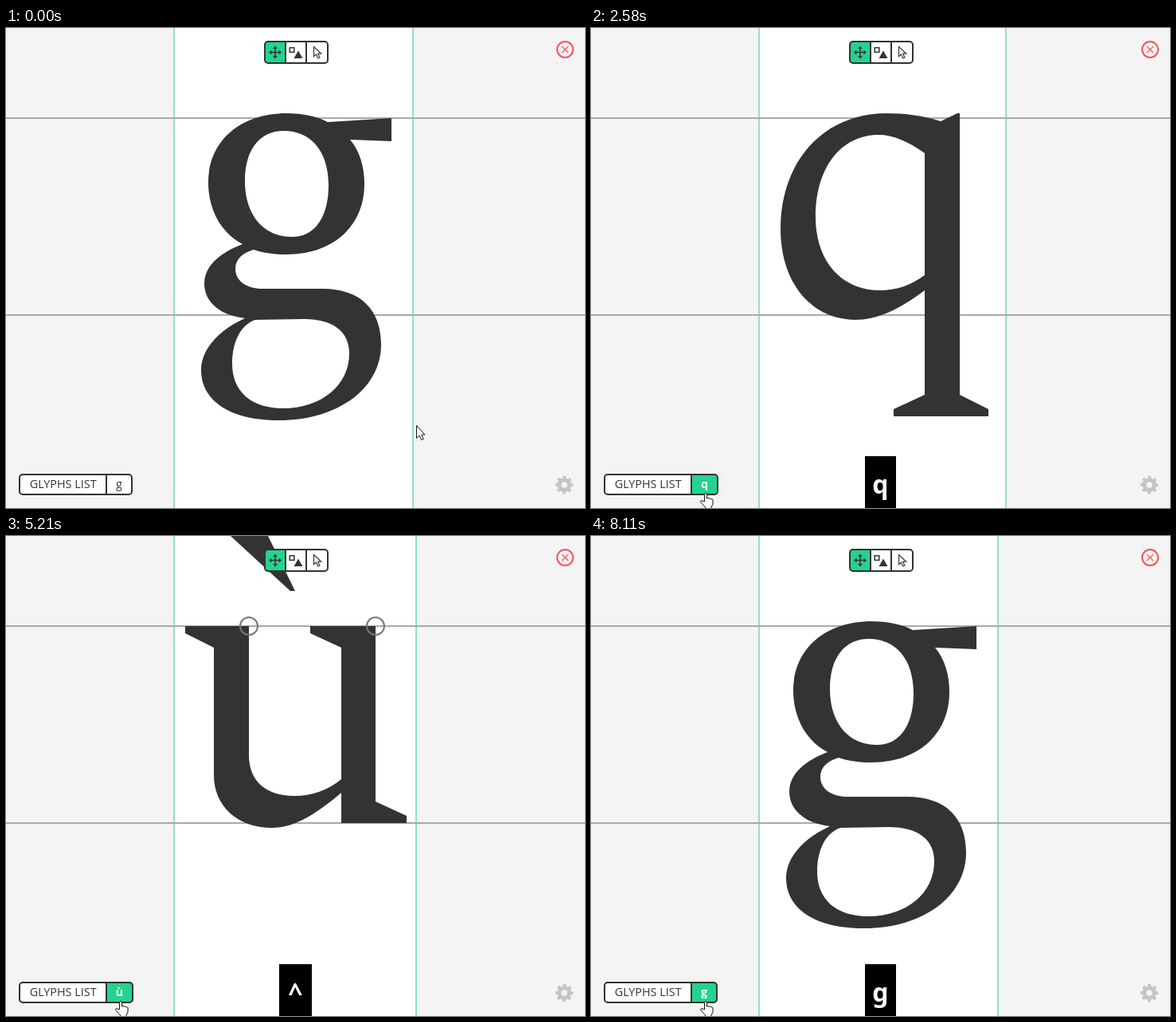
Recreate the animation shown at these times as an HTML page. Size 727 by 602 pixels, loop 8540 ms.

```html
<!DOCTYPE html>
<html lang="en">
<head>
<meta charset="utf-8">
<title>Glyph editor</title>
<style>
  html, body { margin: 0; height: 100%; overflow: hidden; background: #f4f4f4; }
  svg { display: block; }
  text { font: 14.4px "Open Sans", sans-serif; text-anchor: middle; fill: #333; }
  .line { fill: none; stroke: #333; stroke-width: 2; }
  .key text { font: bold 32px "Noto Sans", sans-serif; fill: #fff; }
  .guide { stroke: #8ee2c4; stroke-width: 2; }
  .metric { stroke: #a9a9a9; stroke-width: 2; }
  .pointer { fill: #fff; stroke: #111; stroke-linejoin: round; }
</style>
</head>
<body>
<svg width="727" height="602" viewBox="0 0 727 602">
  <rect id="page" x="211" width="300" height="602" fill="#fff"/>
  <path class="guide" d="M211 0V602"/>
  <path class="guide" id="advance"/>
  <path class="metric" d="M0 113H727M0 360H727"/>
  <path id="glyph" fill="#333" fill-rule="evenodd"/>
  <g id="nodes" fill="none" stroke="#777" stroke-width="2">
    <circle cx="305" cy="113" r="11"/><circle cx="464" cy="113" r="11"/>
  </g>

  <!-- toolbar -->
  <rect x="325" y="17" width="79" height="27" rx="4" fill="#fff"/>
  <path d="M351 17H329q-4 0-4 4v19q0 4 4 4h22z" fill="#24d390"/>
  <rect class="line" x="325" y="17" width="79" height="27" rx="4"/>
  <path class="line" d="M351 17V44M377 17V44"/>
  <g transform="translate(338 30.5)" fill="#333">
    <path d="M-6 0H6M0-6V6" stroke="#333" stroke-width="1.5"/>
    <path d="M0-8l3 3.5h-6zM0 8l3-3.5h-6zM-8 0l3.5-3v6zM8 0l-3.5-3v6z"/>
  </g>
  <rect class="line" x="356.2" y="24.7" width="5.6" height="5.6" style="stroke-width:1.5"/>
  <path d="M367 28.5l5.5 9.5h-11z" fill="#333"/>
  <path d="M386.5 23.5v12l3-2.5 2.2 5 2.2-1-2.2-4.8h4z" fill="#fff" stroke="#444" stroke-width="1.3"/>

  <!-- close and settings -->
  <g fill="none" stroke="#f9545b">
    <circle cx="702" cy="27" r="10" stroke-width="2"/>
    <path d="M698 23l8 8m0-8l-8 8" stroke-width="1.2"/>
  </g>
  <g fill="none" stroke="#c4c4c4">
    <circle cx="701" cy="573" r="6.3" stroke-width="5"/>
    <circle cx="701" cy="573" r="9.5" stroke-width="3.4" stroke-dasharray="3.73" stroke-dashoffset="1.87"/>
  </g>

  <!-- glyph button -->
  <rect class="frame" x="17" y="560" height="25" rx="4" fill="#fff"/>
  <path id="cell"/>
  <rect class="frame line" x="17" y="560" height="25" rx="4"/>
  <path class="line" d="M126 560V585"/>
  <text x="71.7" y="577">GLYPHS LIST</text>
  <text id="label" y="577"></text>

  <g id="keys"></g>
  <path id="arrow" class="pointer" d="M.5 .5V16.5L4.2 13L6.7 18.6L9.2 17.5L6.8 12H11Z"/>
  <path id="hand" class="pointer" d="M6.5 12V2.5q1.5-2.2 3 0V8q1.4-1.3 2.7.3 1.4-1 2.6.5 1.6-.7 2.2 1V15L15 19V22H7.500V19L1.500 12.500q0-2.500 2.500-1.500Z"/>
</svg>
<script>
const LOOP = 8540, GREEN = '#24d390', DULL = '#5cb183';

// advance: right guide, edge: right side of the button
const glyphs = {
  g: { advance: 511, edge: 158, d: `M352 107C374 107 391 111 404 118L484 113V142L432 140C444 154 450 174 450 196
    C450 248 411 284 352 284C337 284 323 282 311 278C297 282 288 290 288 302C288 317 302 327 322 327L397 327
    C446 327 471 354 471 397C471 452 417 492 343 492C282 492 245 468 245 429C245 403 267 379 300 364
    C270 361 249 345 249 320C249 300 266 283 297 271C270 257 254 228 254 194C254 141 295 107 352 107Z
    M349 129C318 129 300 153 300 192C300 234 323 262 359 262C388 262 405 237 405 197C405 155 383 129 349 129Z
    M313 366C295 372 284 393 284 421C284 456 308 477 348 477C396 477 431 448 431 408C431 381 411 365 374 365Z` },
  y: { advance: 474, edge: 158, d: `M197 113H332V123L284 140L356 300L423 143L380 124V113H488V123L446 143L332 411
    C307 468 284 492 256 492C243 492 237 487 237 475V450Q237 447 240 447H264C285 447 300 434 311 410
    L334 355L236 140L197 123Z` },
  q: { advance: 521, edge: 159, d: `M371 107C395 107 418 110 439 117L460 107H463V460L499 478V487H380V478L419 460V329
    C386 354 358 366 332 366C277 366 238 320 238 252C238 166 293 107 371 107Z
    M419 157C398 142 379 134 361 134C314 134 282 175 282 237C282 292 314 329 363 329C383 329 401 323 419 310Z` },
  ù: { advance: 515, edge: 159, d: `M282 0H329L363 69H357Z
    M225 113H305V275C305 307 326 326 362 326C384 326 404 319 421 305V140L382 122V113H464V333L503 351V360H421V322
    C387 351 360 366 334 366C291 366 261 339 261 300V140L225 122Z` },
  m: { advance: 685, edge: 163, d: `M236 137L304 107H313L316 151C346 121 372 107 400 107C434 107 458 124 468 156
    C501 122 527 107 557 107C602 107 628 132 628 177V333L664 351V360H545V351L584 333V200C584 166 564 146 531 146
    C508 146 488 153 469 169V333L508 351V360H387V351L426 333V200C426 166 405 146 373 146C351 146 332 152 315 167
    V333L351 351V360H236V351L271 333V170L236 139Z` },
  ',': { advance: 347, edge: 154, d: `M240 345L258 315Q265 305 272 306C303 316 320 345 320 382C320 415 291 452 244 476
    V465C271 450 288 429 288 407C288 381 268 361 242 351Z` }
};

// character, pressed at, released at, box width
const presses = [
  ['y', 1510, 2580, 38], ['q', 2380, 3480, 39], ['*', 3290, 4350, 34], ['ù', 4120, 5210, 40],
  ['^', 5140, 6100, 41], ['m', 6370, 7220, 49], [',', 6950, 7810, 27], ['g', 8040, LOOP, 39]
];

const $ = id => document.getElementById(id);
const set = (el, attrs) => { for (const k in attrs) el.setAttribute(k, attrs[k]); };
const progress = (t, from, to) => Math.min(1, Math.max(0, (t - from) / (to - from)));
const mix = (a, b, p) => `color-mix(in srgb, ${b} ${p * 100}%, ${a})`;

function cellColor(t) {
  if (t < 820) return mix('#ffffff', GREEN, progress(t, 660, 820));
  if (t >= 3290 && t < 4120) return mix(DULL, GREEN, .7 * progress(t, 3290, 3580));
  if (t >= 6370 && t < 6670) return mix(DULL, GREEN, progress(t, 6340, 6670));
  return GREEN;
}

function drawGlyph(t) {
  const last = presses.filter(([c, on]) => glyphs[c] && t >= on + 30).pop();
  const char = last ? last[0] : 'g';
  const { advance, edge, d } = glyphs[char];
  const hover = t >= 700;
  set($('glyph'), { d });
  set($('page'), { width: advance - 211 });
  set($('advance'), { d: `M${advance} 0V602` });
  $('nodes').style.display = char === 'ù' ? '' : 'none';
  document.querySelectorAll('.frame').forEach(el => set(el, { width: edge - 17 }));
  set($('cell'), { d: `M126 560H${edge - 4}q4 0 4 4v17q0 4-4 4H126z` });
  $('cell').style.fill = cellColor(t);
  $('label').textContent = char;
  set($('label'), { x: (126 + edge) / 2 });
  $('label').style.fill = hover ? '#fff' : '#333';
  $('label').style.fontWeight = hover ? 700 : 400;
}

function drawKeys(t) {
  const shown = presses.filter(([, on, off]) => t >= on && t < off);
  let x = Math.round(363.4 - shown.reduce((sum, key) => sum + key[3], 0) / 2);
  $('keys').innerHTML = shown.map(([char, , , width]) => {
    const box = `<g class="key"><rect x="${x}" y="537" width="${width}" height="65"/>
      <text x="${x + width / 2}" y="584">${char}</text></g>`;
    x += width;
    return box;
  }).join('');
}

function drawPointer(t) {
  const p = progress(t, 70, 820), ease = p * p * (3 - 2 * p);
  const settle = progress(t, 1740, 1830);
  const x = 515 - 372 * ease - settle, y = 498 + 82 * ease + 2 * settle;
  const over = x < 158;
  $('arrow').style.display = over ? 'none' : '';
  $('hand').style.display = over ? '' : 'none';
  set($('arrow'), { transform: `translate(${x} ${y})` });
  set($('hand'), { transform: `translate(${x - 6} ${y})` });
}

function frame() {
  const t = performance.now() % LOOP;
  drawGlyph(t);
  drawKeys(t);
  drawPointer(t);
  requestAnimationFrame(frame);
}
frame();
</script>
</body>
</html>
```
